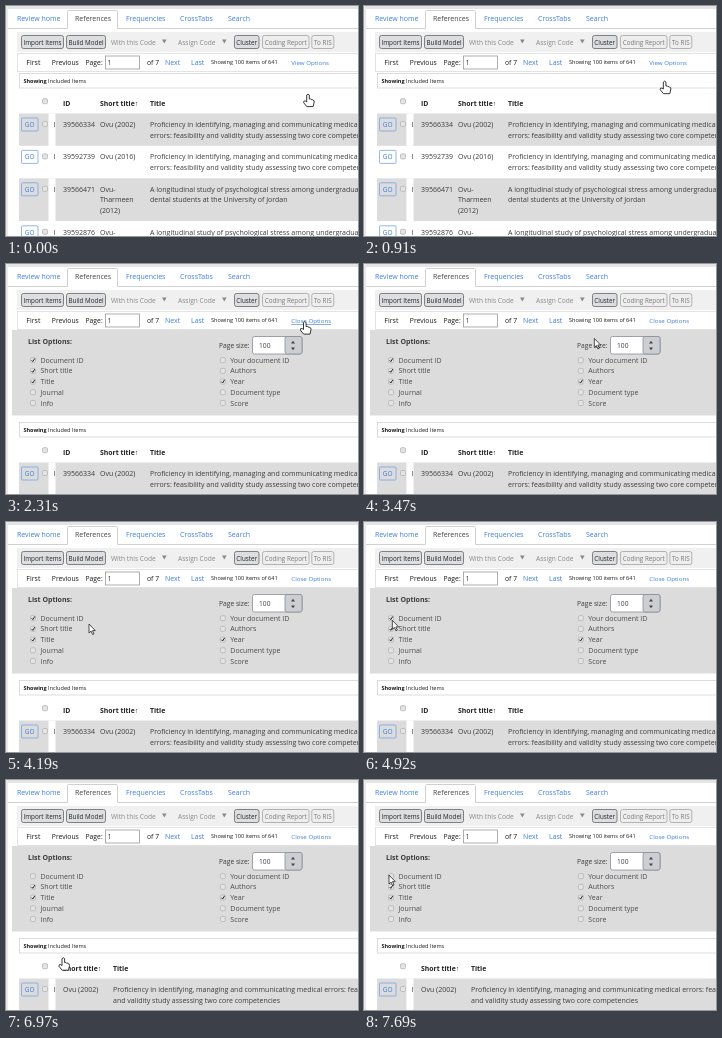
Recreate the animation shown at these times as an HTML page. Size 352x230 px, loop 8000 ms.

```html
<!DOCTYPE html>
<html lang="en">
<head>
<meta charset="utf-8">
<title>Reference list options</title>
<style>
  html, body { margin: 0; width: 100%; height: 100%; overflow: hidden; background: #fff; }
  svg { display: block; font: 7px "Open Sans", "Noto Sans", sans-serif; }
  text { white-space: pre; }
</style>
</head>
<body>
<svg id="stage" width="352" height="230" viewBox="0 0 352 230"></svg>
<script>
const LOOP = 8000, STEP = 60, SHIFT = 91;
const BLUE = '#3c7de0', INK = '#3a3a3a', DARK = '#1a1a1a', GREY = '#dcdcdc';

const text = (x, y, s, { size = 7, fill = INK, bold, mid } = {}) =>
  `<text x="${x}" y="${y}" font-size="${size}" fill="${fill}"${bold ? ' font-weight="700"' : ''}${mid ? ' text-anchor="middle"' : ''}>${s}</text>`;
const rect = (x, y, w, h, fill, stroke = 'none', r = 0) =>
  `<rect x="${x}" y="${y}" width="${w}" height="${h}" rx="${r}" fill="${fill}" stroke="${stroke}" stroke-width=".8"/>`;
const path = (d, attrs) => `<path d="${d}" ${attrs}/>`;
const group = (id, body) => `<g id="${id}">${body}</g>`;

const tick = (x, y) => path(`M${x + 1.1} ${y + 2.6}l1.2 1.3 2-3.2`, 'fill="none" stroke="#222" stroke-width="1"');
const check = (x, y, on) => rect(x, y, 5, 5, '#e4e4e4', '#b4b4b4', 1.2) + (on ? tick(x, y) : '');
const lines = (x, y, list) => list.map((s, i) => text(x, y + i * 10.7, s)).join('');
const drop = x => path(`M${x} 33.5h4.6l-2.3 4z`, 'fill="#888"');

function button(x, w, label, active) {
  return rect(x, 29.5, w, 13, active ? '#dcdee2' : '#eee', active ? '#666' : '#a4a4a4', 2) +
    text(x + w / 2, 38.6, label, { size: 6.3, fill: active ? '#222' : '#777', mid: true });
}

function header() {
  const tabs = [[11, 'Review home'], [69, 'References'], [120, 'Frequencies'], [174, 'CrossTabs'], [222, 'Search']];
  return rect(0, 0, 352, 3, '#e4e4e4') + rect(0, 0, 2, 230, '#e9e9e9') +
    path('M2 22.5H61.5V5.5Q61.5 4.5 62.5 4.5H110.5Q111.5 4.5 111.5 5.5V22.5H352', 'fill="none" stroke="#d0d0d0"') +
    tabs.map(([x, s], i) => text(x, 15.3, s, { fill: i === 1 ? '#444' : BLUE })).join('') +
    rect(11, 26, 342, 20, '#f0f0f0') +
    button(15.5, 42, 'Import Items', true) + button(60.5, 39, 'Build Model', true) +
    text(105, 38.6, 'With this Code', { size: 6.6, fill: '#888' }) + drop(156) +
    text(172, 38.6, 'Assign Code', { size: 6.6, fill: '#888' }) + drop(216) +
    button(228.5, 24.5, 'Cluster', true) + button(256.5, 46.5, 'Coding Report') + button(305.8, 22, 'To RIS') +
    rect(11.5, 47.5, 345, 18, '#fff', '#ddd') +
    text(20.3, 58.5, 'First', { fill: DARK }) + text(45.8, 58.5, 'Previous', { size: 6.8, fill: DARK }) +
    text(79.5, 58.5, 'Page:', { size: 6.8, fill: DARK }) +
    rect(99.5, 50, 34, 13, '#fff', '#999') + text(101.5, 58.5, '1') + text(141, 58.5, 'of 7', { size: 6.8, fill: DARK }) +
    text(159, 58.5, 'Next', { fill: BLUE }) + text(185, 58.5, 'Last', { fill: BLUE }) +
    text(205, 57.5, 'Showing 100 items of 641', { size: 5.6, fill: DARK });
}

function panel() {
  const left = ['Document ID', 'Short title', 'Title', 'Journal', 'Info'];
  const right = ['Your document ID', 'Authors', 'Year', 'Document type', 'Score'];
  const column = (x, list, on) => list.map((s, i) =>
    check(x, 93.7 + i * 10.7, on.includes(i)) + text(x + 10, 98.7 + i * 10.7, s, { fill: '#4a4a4a' })).join('');
  return rect(6, 66, 346, 85.5, GREY) + text(22, 80, 'List Options:', { bold: true }) +
    text(213, 83.5, 'Page size:', { size: 6.7 }) +
    rect(246.5, 72.5, 49.5, 17.5, '#fff', '#8a8f98', 2) + text(253, 84, '100', { size: 6.7 }) +
    rect(279, 72.5, 17, 17.5, '#ccced2', '#8a8f98', 2) +
    path('M285 79.5l2-2.8 2 2.8zM285 83.5l2 2.8 2-2.8z', 'fill="#444"') +
    column(24.5, left, [1, 2]) + column(214.3, right, [2]) + group('idTick', tick(24.5, 93.7));
}

function table(withId) {
  const x = withId ? 94 : 57, titleX = x + 50;
  const skill = withId
    ? ['Proficiency in identifying, managing and communicating medical', 'errors: feasibility and validity study assessing two core competencies']
    : ['Proficiency in identifying, managing and communicating medical errors: feasibility', 'and validity study assessing two core competencies'];
  const stress = ['A longitudinal study of psychological stress among undergraduate', 'dental students at the University of Jordan'];
  const rows = [
    [107.5, 32.4, '39566334', ['Ovu (2002)'], skill],
    [139.9, 32.4, '39592739', ['Ovu (2016)'], skill],
    [172.3, 43, '39566471', ['Ovu-', 'Tharmeen', '(2012)'], stress],
    [215.3, 43, '39592876', ['Ovu-', 'Tharmeen'], stress]
  ];
  const row = ([y, h, id, name, title], i) =>
    rect(13, y, 340, h, i % 2 ? '#fff' : GREY) + rect(42.5, y, 7, h, '#fff') +
    rect(15.5, y + 4.5, 16.5, 13, 'none', '#78a5e4', .8) +
    text(23.7, y + 13.4, 'GO', { size: 6.5, fill: BLUE, mid: true }) +
    check(36.5, y + 8, false) + text(47.7, y + 13.3, 'I') +
    (withId ? text(57, y + 13.3, id) : '') +
    lines(x, y + 13.3, name) + lines(titleX, y + 13.3, title);
  const head = { bold: true, fill: '#222', size: 6.9 };
  return rect(13.5, 67.5, 345, 14.5, '#fff', '#d4d4d4') +
    text(17.4, 76.8, '<tspan font-weight="700">Showing</tspan> Included Items', { size: 5.55, fill: DARK }) +
    check(36.5, 92.7, false) + (withId ? text(57, 99.8, 'ID', head) : '') +
    text(x, 99.8, 'Short title↑', head) + text(titleX, 99.8, 'Title', head) +
    rows.map(row).join('');
}

const stage = document.getElementById('stage');
stage.innerHTML =
  group('tables', group('full', table(true)) + group('slim', table(false))) +
  header() + group('options', panel()) +
  `<text id="link" x="285.3" y="59" font-size="6.15" fill="${BLUE}"></text>` +
  group('cursor',
    path('M-1.3 8V1Q0-.8 1.3 1V5Q2.8 4.2 3.2 5.6Q4.7 4.9 5 6.3Q6.4 6 6.2 8L5.2 12.6H-1.2L-4.4 8.6Q-4.6 6.4-2.6 7Z',
      'id="hand" fill="#fff" stroke="#222" stroke-width=".9" stroke-linejoin="round"') +
    path('M0 0V9L2.1 7.1 3.6 10.5 5 9.8 3.5 6.6H6.3Z',
      'id="arrow" fill="#fff" stroke="#222" stroke-width=".8" stroke-linejoin="round"'));
const el = id => document.getElementById(id);
const show = (id, on) => { el(id).style.display = on ? '' : 'none'; };

// Pointer legs: start, end, target x, target y, ease-out power
const legs = [
  [670, 1450, 298.8, 57.5, 1.5],
  [3110, 3950, 139, 97, 1],
  [3950, 4190, 83, 102, 1],
  [4190, 4790, 30, 100, 2],
  [4860, 5040, 25, 95, 1],
  [6170, 6770, 60, 184.5, 1.3],
  [6910, 7690, 25, 95, 1]
];

function pointer(t) {
  let x = 302, y = 88;
  for (const [start, end, toX, toY, power] of legs) {
    if (t < start) break;
    const now = start + Math.floor((t - start) / STEP) * STEP;
    const k = 1 - (1 - Math.min(1, (now - start) / (end - start))) ** power;
    x += (toX - x) * k;
    y += (toY - y) * k;
  }
  return [x, y];
}

function draw(t) {
  const open = t >= 2310, slim = t >= 5830, hover = t >= 1390 && t < 3230;
  const [x, y] = pointer(t), hand = t < 3230 || y > 172;
  show('options', open);
  show('idTick', t < 5700);
  show('full', !slim);
  show('slim', slim);
  show('hand', hand);
  show('arrow', !hand);
  el('tables').setAttribute('transform', `translate(0 ${open ? SHIFT : 0})`);
  el('cursor').setAttribute('transform', `translate(${x} ${y})`);
  el('link').textContent = open ? 'Close Options' : 'View Options';
  el('link').setAttribute('text-decoration', hover ? 'underline' : 'none');
}

const begin = performance.now();
function frame() {
  draw((performance.now() - begin) % LOOP);
  requestAnimationFrame(frame);
}
frame();
</script>
</body>
</html>
```
